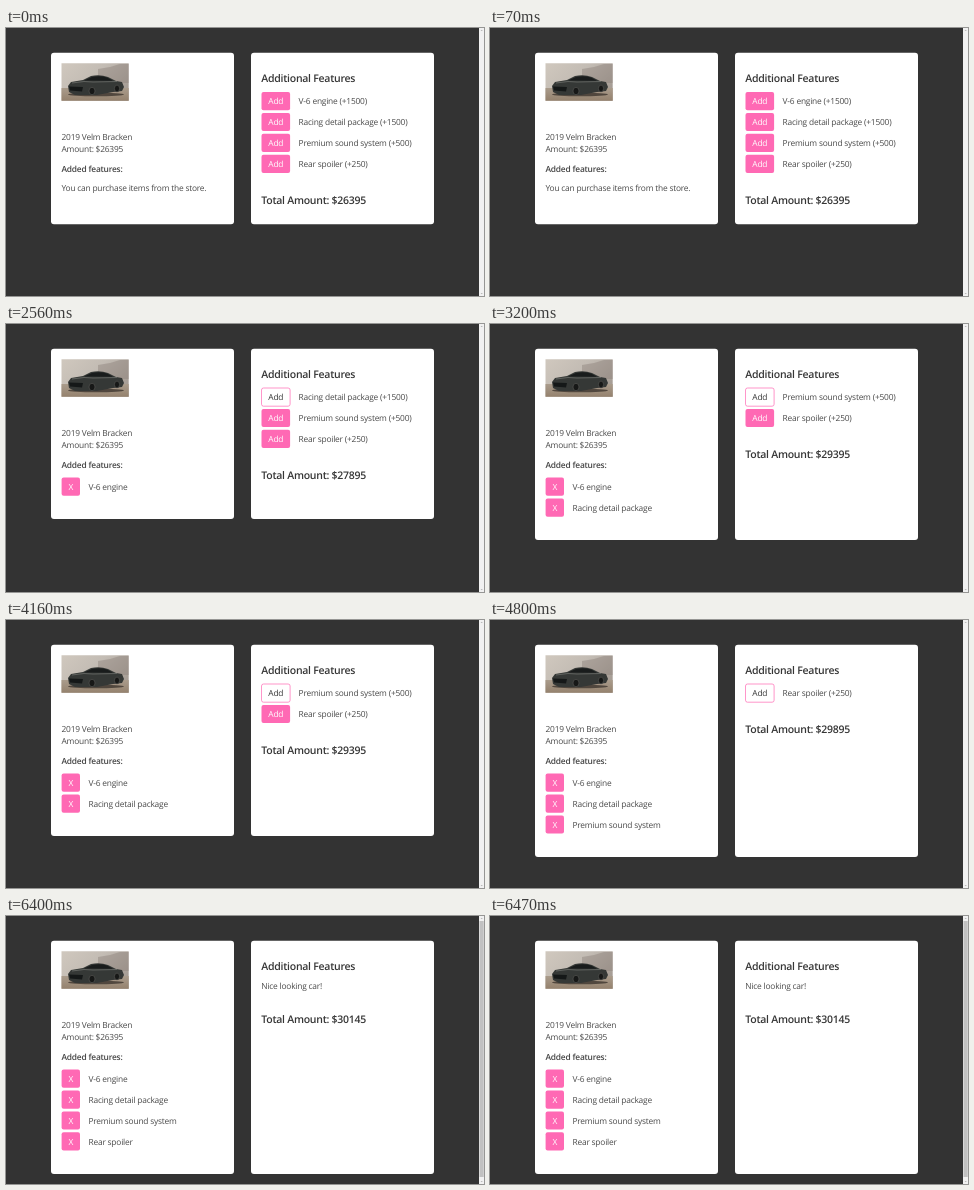
Write an HTML page that moves like this. It is 478 by 268 pixels and loops after 8 s.

```html
<!DOCTYPE html>
<html lang="en">
<head>
<meta charset="utf-8">
<title>Car configurator</title>
<style>
  html, body { margin: 0; width: 100%; height: 100%; overflow: hidden; background: #333; }
  svg { display: block; width: 478px; height: 268px; }
  text {
    font: 8.4px "Open Sans", "Noto Sans", sans-serif;
    letter-spacing: -.025em;
    text-rendering: geometricPrecision;
    fill: #4a4a4a;
  }
  .heading { font-size: 10.5px; font-weight: 600; fill: #363636; }
  .strong { font-weight: 600; fill: #444; }
  .label { text-anchor: middle; fill: #fff; }
  .focused .label { fill: #363636; }
  .button { fill: #ff69b4; }
  .focused .button { fill: #fff; stroke: #ff69b4; stroke-width: .7; }
</style>
</head>
<body>
<svg viewBox="0 0 478 268">
  <defs>
    <linearGradient id="fog" x2="1" y2=".6">
      <stop offset="0" stop-color="#d0c8be"/>
      <stop offset=".5" stop-color="#c3bcb4"/>
      <stop offset="1" stop-color="#a69d95"/>
    </linearGradient>
    <linearGradient id="road" x2="0" y2="1">
      <stop offset="0" stop-color="#aa9c8c"/>
      <stop offset="1" stop-color="#94816d"/>
    </linearGradient>
    <clipPath id="photo"><path d="M55.5 35.3h67.2v37.4h-67.2z"/></clipPath>
  </defs>
  <rect width="478" height="268" fill="#333"/>
  <g fill="#fff">
    <rect class="card" x="45" y="24.8" width="183" rx="3"/>
    <rect class="card" x="245" y="24.8" width="183" rx="3"/>
  </g>
  <g clip-path="url(#photo)">
    <rect x="55" y="35" width="68" height="38" fill="url(#fog)"/>
    <path d="M92 41l12-2 10-3h9v19H92z" fill="#8d827b" opacity=".45"/>
    <path d="M55 60h68v13H55z" fill="url(#road)"/>
    <ellipse cx="90" cy="66.5" rx="28" ry="1.8" fill="#51473e"/>
    <path d="M62 58l3-4 12-2 8-4q9-2 17 1l8 4 6 1 2 5-2 4-9 1-16 3-22 0-6-3z" fill="#353836"/>
    <path d="M78 52.5l8-3.5q8-1.500 15 .5l6 3.200z" fill="#191c1c"/>
    <path d="M63 58.500l14 .5-1 4.500-12-1z" fill="#151818"/>
    <path d="M66 55l12-1.500 9 .5 24-.5" fill="none" stroke="#6b6e6a" stroke-width=".8"/>
    <g fill="#171817" stroke="#5c5c58" stroke-width=".6">
      <ellipse cx="86" cy="63" rx="3" ry="3.700"/>
      <ellipse cx="111" cy="60.500" rx="2.600" ry="3.400"/>
    </g>
  </g>
  <text x="55.5" y="111.5">2019 Velm Bracken</text>
  <text x="55.5" y="124.1">Amount: $26395</text>
  <text class="strong" x="55.5" y="143.6">Added features:</text>
  <text class="heading" x="255.3" y="53.5">Additional Features</text>
  <g id="content"></g>
  <rect x="473" width="5" height="268" fill="#f1f1f1"/>
  <path d="M474.5 3l1.200-1.300 1.200 1.300zM474.500 265l1.200 1.300 1.200-1.300z" fill="#b5b5b5"/>
  <rect id="thumb" x="473.5" y="5" width="4.2" height="256" fill="#c1c1c1"/>
</svg>
<script>
const features = [
  ["V-6 engine", 1500],
  ["Racing detail package", 1500],
  ["Premium sound system", 500],
  ["Rear spoiler", 250]
];
const basePrice = 26395, rowStep = 20.9, stepTime = 1600, loopTime = 8000;
const cardTop = 24.8, cardBottoms = [196.3, 195, 216, 237, 258];
const content = document.getElementById("content");
const thumb = document.getElementById("thumb");
const cards = document.querySelectorAll(".card");

const text = (x, y, value, kind = "") =>
  `<text class="${kind}" x="${x}" y="${y}">${value}</text>`;

function row(x, y, width, label, description, focused) {
  return `<g class="${focused ? "focused" : ""}">
    <rect class="button" x="${x}" y="${y}" width="${width}" height="18.2" rx="2"/>
    ${text(x + width / 2, y + 12.2, label, "label")}
  </g>${text(x + width + 8.5, y + 12.2, description)}`;
}

function render(count) {
  const added = features.slice(0, count);
  const available = features.slice(count);
  const total = added.reduce((sum, [, price]) => sum + price, basePrice);
  const left = count
    ? added.map(([name], i) => row(55.6, 153.6 + i * rowStep, 18.4, "X", name))
    : [text(55.5, 162.7, "You can purchase items from the store.")];
  const right = available.length
    ? available.map(([name, price], i) =>
        row(255.5, 64 + i * rowStep, 28.6, "Add", `${name} (+${price})`, count > 0 && i === 0))
    : [text(255.3, 73.1, "Nice looking car!")];
  const totalY = available.length ? 113.4 + (available.length - 1) * rowStep : 107;
  content.innerHTML = left.concat(right, text(255.3, totalY, `Total Amount: $${total}`, "heading")).join("");
  cards.forEach(card => card.setAttribute("height", cardBottoms[count] - cardTop));
  thumb.setAttribute("visibility", available.length ? "hidden" : "visible");
}

let shown = -1;
const start = performance.now();
function tick() {
  const count = Math.floor((performance.now() - start) % loopTime / stepTime);
  if (count !== shown) render(shown = count);
  requestAnimationFrame(tick);
}
tick();
</script>
</body>
</html>
```
